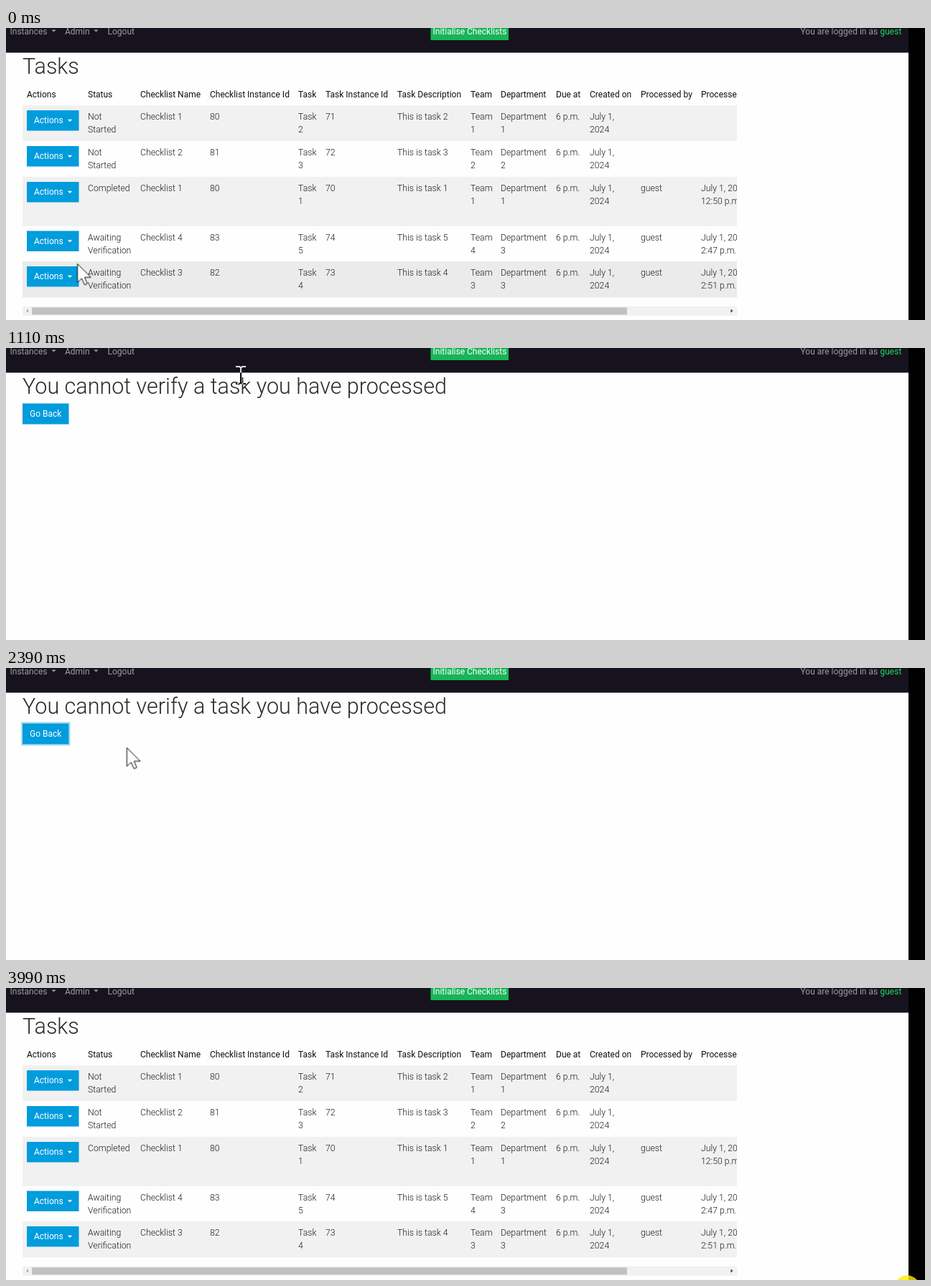
An HTML page for the animation above (4.08 s loop, 1280x408 px).

```html
<!DOCTYPE html>
<html lang="en">
<head>
<meta charset="utf-8">
<title>Tasks</title>
<style>
  html, body { margin: 0; width: 100%; height: 100%; overflow: hidden; background: #fefefe; }
  svg { display: block; width: 1280px; height: 408px; }
  text { font: 400 12px Roboto, sans-serif; fill: #111; white-space: pre; }
  .light { font-weight: 300; font-size: 12.25px; fill: #1c1c1c; }
  .title { font-weight: 300; font-size: 30.5px; fill: #2a2a2a; }
  .nav { fill: #9c9aa1; }
  .white { fill: #fff; }
  .btn { fill: #009cdc; }

  .list, .denied, .arrow, .beam, .hand, .hover4, .hover5, .ping { animation: 4080ms step-end infinite; }
  .list { animation-name: list; }
  .denied { animation-name: denied; }
  .hover4 { animation-name: hover4; }
  .hover5 { animation-name: hover5; }
  .ping { animation-name: ping; }
  .click { animation: click 4080ms linear infinite; }
  .back { animation: press 4080ms linear infinite; }
  .glow { animation: glow 4080ms linear infinite; }

  .cursor { animation: move 4080ms linear infinite; }
  .beamwrap { mix-blend-mode: difference; }
  .arrow { animation-name: arrow; }
  .beam { animation-name: beam; }
  .hand { animation-name: hand; }

  @keyframes list {
    0% { visibility: visible; } 8.33% { visibility: hidden; } 74.26%, 100% { visibility: visible; }
  }
  @keyframes denied {
    0% { visibility: hidden; } 8.33% { visibility: visible; } 74.26%, 100% { visibility: hidden; }
  }
  @keyframes hover4 {
    0% { opacity: 0; } 75.3% { opacity: 1; } 77%, 100% { opacity: 0; }
  }
  @keyframes hover5 {
    0% { opacity: 1; } 8.33%, 100% { opacity: 0; }
  }
  @keyframes ping {
    0% { opacity: 0; } 97.79%, 100% { opacity: .8; }
  }
  @keyframes click {
    0%, 45.33% { opacity: 0; } 45.34%, 48% { opacity: .55; } 50.5%, 100% { opacity: 0; }
  }
  @keyframes press {
    0%, 45.33% { fill: #009cdc; } 45.8%, 48% { fill: #007fb8; } 50.5%, 100% { fill: #009cdc; }
  }
  @keyframes glow {
    0%, 48% { opacity: 0; } 50.5%, 100% { opacity: 1; }
  }
  @keyframes move {
    0%, 5.88% { transform: translate(99.5px, 329.5px); animation-timing-function: ease-in; }
    10.29% { transform: translate(170.5px, 310.5px); }
    14.5% { transform: translate(160px, 225px); animation-timing-function: ease-out; }
    18.87%, 19.1% { transform: translate(97px, 162px); animation-timing-function: ease-in-out; }
    27.21% { transform: translate(327px, 38px); }
    29.41% { transform: translate(336px, 41px); }
    32.11%, 32.3% { transform: translate(333px, 44px); animation-timing-function: ease-in-out; }
    38.73% { transform: translate(44px, 95px); animation-timing-function: ease-out; }
    41.42%, 55.64% { transform: translate(59.5px, 97px); animation-timing-function: ease-in-out; }
    66.67%, 72.5% { transform: translate(787px, 193px); animation-timing-function: ease-in; }
    76.23% { transform: translate(1023px, 329px); }
    79.9% { transform: translate(1190px, 409px); animation-timing-function: ease-out; }
    83.8%, 100% { transform: translate(1255px, 420px); }
  }
  @keyframes arrow {
    0% { visibility: visible; } 25.5% { visibility: hidden; }
    36% { visibility: visible; } 37.7% { visibility: hidden; }
    57.3% { visibility: visible; } 75.5% { visibility: hidden; }
    77%, 100% { visibility: visible; }
  }
  @keyframes beam {
    0% { visibility: hidden; } 25.5% { visibility: visible; } 36% { visibility: hidden; }
    75.5% { visibility: visible; } 77%, 100% { visibility: hidden; }
  }
  @keyframes hand {
    0% { visibility: hidden; } 37.7% { visibility: visible; } 57.3%, 100% { visibility: hidden; }
  }
</style>
</head>
<body>
<svg viewBox="0 0 1280 408">
  <defs>
    <clipPath id="pane"><path d="M0 0H1018V408H0z"/></clipPath>
    <path id="caret" d="M-3.2-1.6H3.2L0 1.6z"/>
  </defs>
  <rect width="1280" height="408" fill="#fefefe"/>

  <g class="list">
    <text class="title" x="23" y="63.5">Tasks</text>
    <g id="table" clip-path="url(#pane)"></g>
    <rect x="23" y="389" width="995" height="13" fill="#f1f1f1"/>
    <rect x="36" y="390.5" width="829" height="10" fill="#c1c1c1"/>
    <path d="M31 392.8v5l-3-2.5z" fill="#a3a3a3"/>
    <path d="M1009.5 392.8v5l3-2.5z" fill="#404040"/>
  </g>

  <g class="denied">
    <text class="title" x="23" y="63.5">You cannot verify a task you have processed</text>
    <rect class="glow" x="22" y="76.5" width="66.5" height="31" fill="none" stroke="#a5dcf4" stroke-width="2"/>
    <rect class="back" x="23" y="77.5" width="64.5" height="29"/>
    <text class="white" x="33" y="96">Go Back</text>
  </g>

  <rect width="1280" height="34.5" fill="#17131e"/>
  <text class="nav" x="5.5" y="8.5">Instances</text>
  <use href="#caret" x="66.5" y="4" fill="#9c9aa1"/>
  <text class="nav" x="82" y="8.5">Admin</text>
  <use href="#caret" x="125.5" y="4" fill="#9c9aa1"/>
  <text class="nav" x="141.5" y="8.5">Logout</text>
  <rect x="591.5" width="108.5" height="17" fill="#19b457"/>
  <text class="white" x="594.5" y="8.5">Initialise Checklists</text>
  <text class="nav" x="1106.5" y="8.5">You are logged in as</text>
  <text x="1217.5" y="8.5" style="fill:#1ddb62">guest</text>
  <rect x="1257" width="23" height="408" fill="#000"/>

  <circle class="click" cx="60" cy="96" r="18.5" fill="#ffee00"/>
  <circle class="ping" cx="1255" cy="420" r="18.5" fill="#ffee00"/>

  <g class="cursor">
    <path class="arrow" d="M0 0V26L6 20.4L10 29.4L13.8 27.7L10 18.9H18.7z" fill="#fff" stroke="#000"/>
  </g>
  <g class="cursor beamwrap">
    <path class="beam" d="M-7-12H-2L0-10.5L2-12H7M0-11V11M-7 12H-2L0 10.5L2 12H7" fill="none" stroke="#fff" stroke-width="2"/>
  </g>
  <g class="cursor">
    <g class="hand">
      <path d="M-2 20V1.5Q-2-.5 .3-.5T2.6 1.5V10Q3 8.5 5 9T7.3 11Q8 9.5 10 10T12 12Q13 11 15 12T16.5 15V24Q16.5 33.8 7 33.8Q1 33.8-2 29L-8.5 21Q-9.5 17-6 17.2z" fill="#fff" stroke="#000"/>
      <path d="M2.6 9V16M7.3 11V16M12 12V16.5" fill="none" stroke="#000"/>
    </g>
  </g>
</svg>
<script>
  const columns = [29, 114, 187, 284, 407, 445, 545, 647, 689, 766, 813, 884, 968];
  const heads = ['Actions', 'Status', 'Checklist Name', 'Checklist Instance Id', 'Task', 'Task Instance Id',
    'Task Description', 'Team', 'Department', 'Due at', 'Created on', 'Processed by', 'Processed on'];
  // top, height, status, checklist, instance, task, task instance, team, department, time processed
  const rows = [
    [108, 50, 'Not|Started', 1, 80, 2, 71, 1, 1],
    [158, 50, 'Not|Started', 2, 81, 3, 72, 2, 2],
    [208, 69, 'Completed', 1, 80, 1, 70, 1, 1, '12:50 p.m.'],
    [276.5, 49.5, 'Awaiting|Verification', 4, 83, 5, 74, 4, 3, '2:47 p.m.'],
    [326, 50.5, 'Awaiting|Verification', 3, 82, 4, 73, 3, 3, '2:51 p.m.']
  ];

  const label = (x, y, str, cls = '') => `<text class="${cls}" x="${x}" y="${y}">${str}</text>`;
  const band = (y, h, fill, cls = '') =>
    `<rect class="${cls}" x="23" y="${y}" width="995" height="${h}" fill="${fill}"/>`;

  let out = heads.map((h, i) => label(columns[i], 96.8, h)).join('');
  rows.forEach(([top, h, status, list, inst, task, taskInst, team, dept, time], i) => {
    if (i % 2 === 0) out += band(top, h, '#f1f1f1');
    if (i > 2) out += band(top, h, '#ebebeb', 'hover' + (i + 1));
    out += `<rect class="btn" x="29" y="${top + 7}" width="72.5" height="28.5"/>`
      + label(39, top + 25.3, 'Actions', 'white')
      + `<use href="#caret" x="89" y="${top + 21.3}" fill="#fff"/>`;
    const cells = [status, `Checklist ${list}`, `${inst}`, `Task|${task}`, `${taskInst}`, `This is task ${task}`,
      `Team|${team}`, `Department|${dept}`, '6 p.m.', 'July 1,|2024'];
    if (time) cells.push('guest', `July 1, 2024,|${time}`);
    cells.forEach((cell, c) => cell.split('|').forEach((line, n) => {
      out += label(columns[c + 1], top + 20.3 + 18 * n, line, 'light');
    }));
  });
  document.getElementById('table').innerHTML = out;
</script>
</body>
</html>
```
